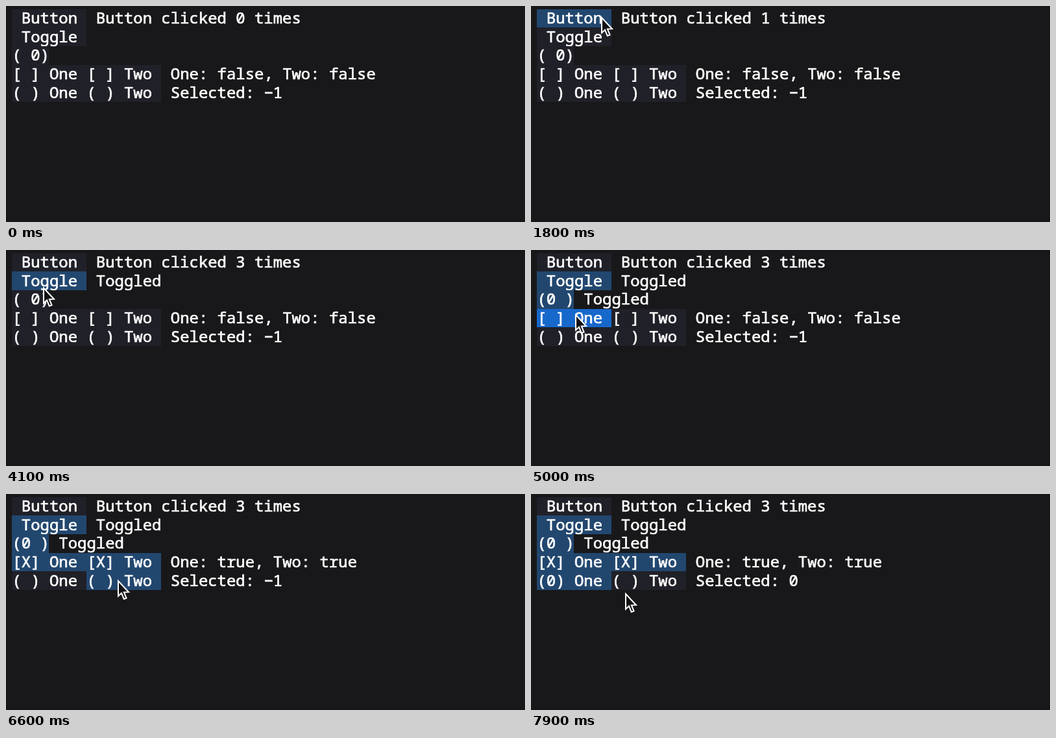
An HTML page with a canvas for the animation above (8000 ms loop, 800x333 px).

```html
<!DOCTYPE html>
<html lang="en">
<head>
<meta charset="utf-8">
<title>Terminal widgets</title>
<style>
  html, body { margin: 0; width: 100%; height: 100%; overflow: hidden; background: #18181a; }
  canvas { display: block; }
</style>
</head>
<body>
<canvas id="stage" width="800" height="333"></canvas>
<script>
const ctx = document.getElementById('stage').getContext('2d');
const LOOP = 8000, STEP = 100, HOLD = 200;
const LEFT = 9.5, TOP = 4.5, COL = 14.37, ROW = 28.7;
const BACK = '#18181a', IDLE = '#202028', HOVER = '#22476f', DOWN = '#1768cb';

// The pointer appears at the first stop, then eases from stop to stop.
const moves = [
  { from: 400, to: 400, x: 606, y: 53 },
  { from: 400, to: 700, x: 526, y: 101 },
  { from: 900, to: 1600, x: 108, y: 17 },
  { from: 2500, to: 2700, x: 162, y: 20 },
  { from: 2700, to: 3400, x: 58, y: 38 },
  { from: 3900, to: 4300, x: 56, y: 77 },
  { from: 4400, to: 5000, x: 68, y: 99 },
  { from: 5400, to: 5900, x: 172, y: 107 },
  { from: 6300, to: 6600, x: 172, y: 133 },
  { from: 7100, to: 7300, x: 70, y: 137 },
  { from: 7600, to: 7850, x: 145, y: 153 }
];

// Times at which the mouse button is released
const up = { toggle: 3700, slide: 4700, one: 5400, two: 6100, second: 7000, first: 7600 };
const clicks = [1800, 1900, 2100];

function pointerAt(t) {
  const i = moves.findLastIndex(m => t >= m.from);
  if (i < 0) return null;
  const b = moves[i], a = moves[Math.max(0, i - 1)];
  const k = Math.min(1, (t - b.from) / (b.to - b.from || 1));
  const s = i ? k * k * (3 - 2 * k) : 1;
  return { x: a.x + (b.x - a.x) * s, y: a.y + (b.y - a.y) * s };
}

function text(s, row, col) {
  const x = LEFT + col * COL, y = 27 + row * ROW;
  ctx.fillText(s, x, y);
  ctx.strokeText(s, x, y);
}

function widget(t, label, row, col, on, release, hold = HOLD) {
  const x = LEFT + col * COL, y = TOP + row * ROW, w = label.length * COL;
  const p = pointerAt(t - STEP);
  const over = p && p.x >= x && p.x < x + w && p.y >= y && p.y < y + ROW;
  const down = [release].flat().some(r => t >= r - hold && t < r);
  ctx.fillStyle = down ? DOWN : on || over ? HOVER : IDLE;
  ctx.fillRect(Math.round(x - 0.5), Math.round(y), Math.round(w), Math.ceil(ROW));
  ctx.fillStyle = '#fff';
  text(label, row, col);
}

function drawPointer({ x, y }) {
  ctx.save();
  ctx.translate(x, y);
  ctx.fillStyle = '#111113';
  ctx.lineWidth = 2;
  const arrow = new Path2D('M1 1V24.5L6 19.8L9.8 29L13.6 27.5L9.8 18.5L17 18.2Z');
  ctx.fill(arrow);
  ctx.stroke(arrow);
  ctx.restore();
}

function draw(t) {
  const count = clicks.filter(c => t >= c).length;
  const toggled = t >= up.toggle, slid = t >= up.slide;
  const one = t >= up.one, two = t >= up.two;
  const pick = t >= up.first ? 0 : t >= up.second ? 1 : -1;
  const box = on => on ? '[X]' : '[ ]';
  const dot = i => pick === i ? '(0)' : '( )';

  ctx.fillStyle = BACK;
  ctx.fillRect(0, 0, 800, 333);
  ctx.font = '23.95px "Noto Sans Mono", "DejaVu Sans Mono", monospace';
  ctx.strokeStyle = '#fff';
  ctx.lineWidth = 0.7;

  widget(t, ' Button ', 0, 0, false, [clicks[0], clicks[2]]);
  widget(t, ' Toggle ', 1, 0, toggled, up.toggle);
  widget(t, slid ? '(0 )' : '( 0)', 2, 0, slid, up.slide);
  widget(t, box(one) + ' One ', 3, 0, one, up.one, 2 * HOLD);
  widget(t, box(two) + ' Two ', 3, 8, two, up.two);
  widget(t, dot(0) + ' One ', 4, 0, pick === 0, up.first);
  widget(t, dot(1) + ' Two ', 4, 8, pick === 1, up.second);

  text(`Button clicked ${count} times`, 0, 9);
  if (toggled) text('Toggled', 1, 9);
  if (slid) text('Toggled', 2, 5);
  text(`One: ${one}, Two: ${two}`, 3, 17);
  text('Selected: ' + (pick < 0 ? '\u22121' : pick), 4, 17);

  const p = pointerAt(t);
  if (p) drawPointer(p);
}

const start = performance.now();
function tick() {
  const t = (performance.now() - start) % LOOP;
  draw(Math.floor(t / STEP) * STEP);
  requestAnimationFrame(tick);
}
tick();
</script>
</body>
</html>
```
